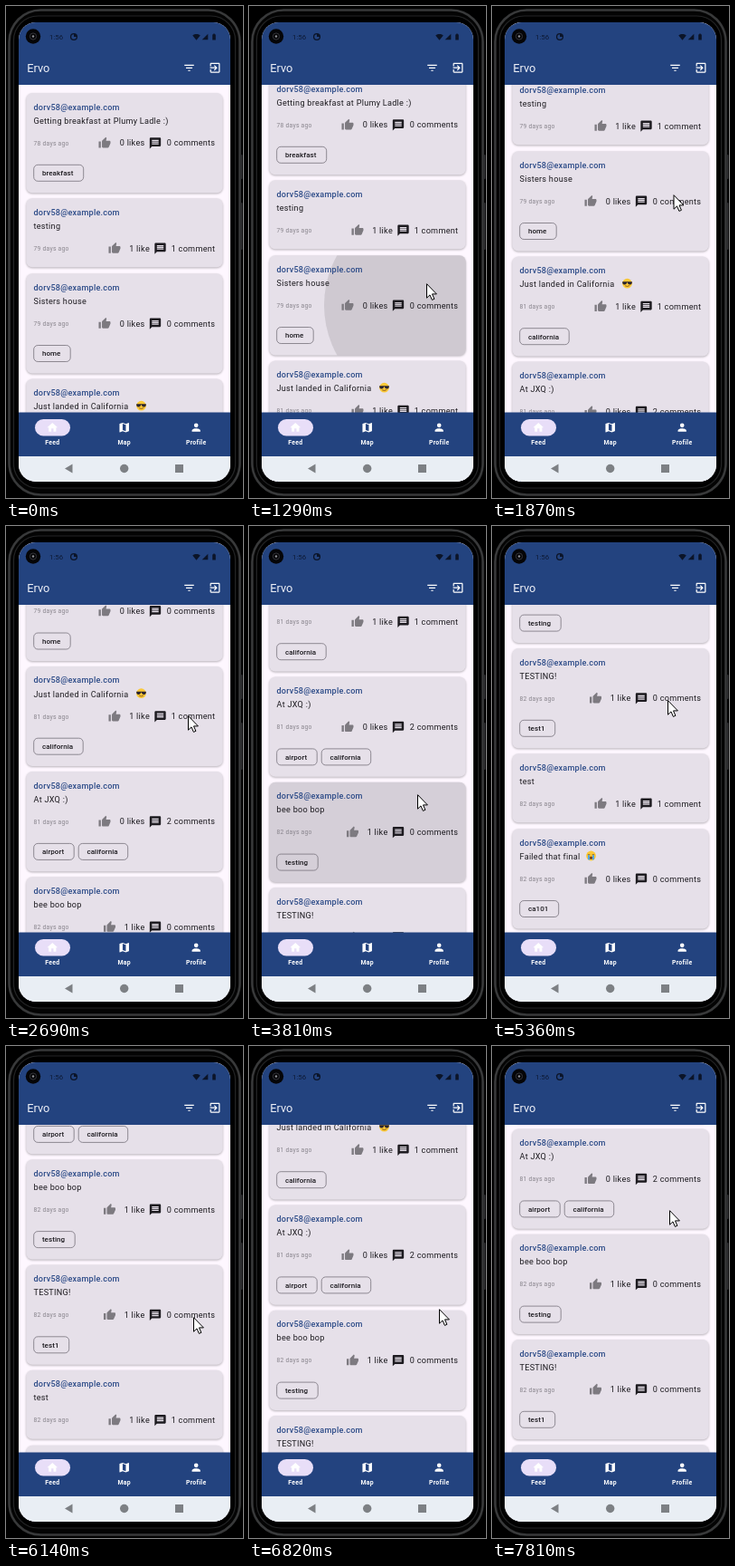
Write an HTML page that moves like this. It is 262x543 px and loops after 8000 ms.

```html
<!DOCTYPE html>
<html lang="en">
<head>
<meta charset="utf-8">
<title>Feed</title>
<style>
html, body { margin: 0; width: 100%; height: 100%; overflow: hidden; background: #000; }
svg { display: block; width: 262px; height: 543px; font-family: Roboto, sans-serif; }
.mail { font-size: 9.1px; font-weight: 500; letter-spacing: .2px; fill: #2b4a87; }
.body { font-size: 9.1px; letter-spacing: .28px; fill: #1d1b20; }
.age { font-size: 6.8px; letter-spacing: .23px; fill: #8a868e; }
.end { text-anchor: end; }
.tag { font-size: 8px; font-weight: 500; letter-spacing: .06px; fill: #1d1b20; }
.nav { font-size: 6.9px; font-weight: 700; letter-spacing: .25px; fill: #fff; text-anchor: middle; }
.card { fill: #e6e0e9; filter: drop-shadow(0 1px 1px rgba(0, 0, 0, .28)); }
.chip { fill: none; stroke: #77727c; stroke-width: .8; }
</style>
</head>
<body>
<svg id="stage" viewBox="0 0 262 543"></svg>
<script>
const LOOP = 8000, BLUE = '#23437f', MAIL = 'dorv58@example.com';

const ICONS = {
  thumb: 'M1 21h4V9H1v12zm22-11c0-1.1-.9-2-2-2h-6.31l.95-4.57.03-.32c0-.41-.17-.79-.44-1.06L14.17 1 7.59 7.59C7.22 7.95 7 8.45 7 9v10c0 1.1.9 2 2 2h9c.83 0 1.54-.5 1.84-1.22l3.02-7.05c.09-.23.14-.47.14-.73v-2z',
  note: 'M20 2H4c-1.1 0-2 .9-2 2v18l4-4h14c1.1 0 2-.9 2-2V4c0-1.1-.9-2-2-2zm-2 12H6v-2h12v2zm0-3H6V9h12v2zm0-3H6V6h12v2z',
  filter: 'M10 18h4v-2h-4v2zM3 6v2h18V6H3zm3 7h12v-2H6v2z',
  exit: 'M10.1 15.6 11.5 17l5-5-5-5-1.4 1.4 2.6 2.6H3v2h9.7zM19 3H5c-1.1 0-2 .9-2 2v4h2V5h14v14H5v-4H3v4c0 1.1.9 2 2 2h14c1.1 0 2-.9 2-2V5c0-1.1-.9-2-2-2z',
  home: 'M10 20v-6h4v6h5v-8h3L12 3 2 12h3v8z',
  map: 'M20.5 3 15 5.1 9 3 3.4 4.9 3 5.4V20.5l.7.5L9 18.9l6 2.1 5.6-1.9.4-.5V3.5zM15 19l-6-2.1V5l6 2.1z',
  person: 'M12 12a4 4 0 1 0 0-8 4 4 0 0 0 0 8zm0 2c-2.7 0-8 1.3-8 4v2h16v-2c0-2.7-5.3-4-8-4z',
  wifi: 'M12 21 24 6.5C20 3.3 16 2 12 2S4 3.3 0 6.5z',
  signal: 'M2 22h20V2z',
  battery: 'M15.7 4H14V2h-4v2H8.3L7 5.3V22h10V5.3z'
};

const CHIPS = { breakfast: 55, home: 40.5, california: 54.5, airport: 44.5, testing: 45.5, test1: 39, ca101: 43 };

const POSTS = [
  { text: 'Getting breakfast at Plumy Ladle :)', age: 78, likes: 0, notes: 0, tags: ['breakfast'] },
  { text: 'testing', age: 79, likes: 1, notes: 1, tags: [] },
  { text: 'Sisters house', age: 79, likes: 0, notes: 0, tags: ['home'] },
  { text: 'Just landed in California', age: 81, likes: 1, notes: 1, tags: ['california'], face: 'cool', faceX: 149.5 },
  { text: 'At JXQ :)', age: 81, likes: 0, notes: 2, tags: ['airport', 'california'] },
  { text: 'bee boo bop', age: 82, likes: 1, notes: 0, tags: ['testing'] },
  { text: 'TESTING!', age: 82, likes: 1, notes: 0, tags: ['test1'] },
  { text: 'test', age: 82, likes: 1, notes: 1, tags: [] },
  { text: 'Failed that final', age: 82, likes: 0, notes: 0, tags: ['ca101'], face: 'sob', faceX: 109.5 }
];

// Bursts of movement: keys are [step, scroll, cursor x, cursor y]
const BURSTS = [
  { from: 310, to: 430, steps: 2, keys: [[0, 0, 252, 418], [1, 0, 254, 418]] },
  { from: 710, to: 840, steps: 2, keys: [[0, 0, 222, 376], [1, 0, 196, 343]] },
  { from: 1290, to: 2270, steps: 8, keys: [[0, 20, 196, 306], [3, 118, 200, 208], [5, 152, 201, 208], [7, 165, 203, 300]] },
  { from: 2420, to: 3420, steps: 8, keys: [[0, 175, 203, 290], [2, 256.5, 201, 209], [4, 316, 201, 209], [7, 341, 188, 316]] },
  { from: 3690, to: 4110, steps: 4, keys: [[0, 341, 186, 316], [1, 361, 186, 296], [3, 455, 190, 200]] },
  { from: 4510, to: 5500, steps: 8, keys: [[0, 465, 192, 290], [3, 563, 194, 192], [5, 615, 194, 192], [6, 625, 194, 192], [7, 625, 195, 192]] },
  { from: 5750, to: 6690, steps: 8, keys: [[0, 610, 196, 207], [3, 518.5, 207, 299], [5, 420, 209, 330], [7, 345, 210, 305]] },
  { from: 6820, to: 7370, steps: 5, keys: [[0, 352, 210, 290], [3, 425, 210, 210], [4, 436, 210, 199]] },
  { from: 7680, to: 7810, steps: 2, keys: [[0, 436, 203, 190], [1, 436, 196, 181]] }
];

const PRESSES = [
  { from: 1290, to: 1425, post: 2, r: 113, alpha: .1 },
  { from: 3690, to: 3945, post: 5, r: 260, alpha: .075 }
];

const icon = (name, cx, cy, size, fill) =>
  `<path d="${ICONS[name]}" fill="${fill}" fill-rule="evenodd" transform="translate(${cx - size / 2} ${cy - size / 2}) scale(${size / 24})"/>`;
const text = (cls, x, y, str) => `<text class="${cls}" x="${x}" y="${y}">${str}</text>`;
const rect = (x, y, w, h, r, attrs = '') => `<rect x="${x}" y="${y}" width="${w}" height="${h}" rx="${r}" ${attrs}/>`;
const count = (n, word) => `${n} ${word}${n === 1 ? '' : 's'}`;

function face(kind, x) {
  const head = '<circle r="5.4" fill="#fbc937"/>';
  const parts = kind === 'cool'
    ? '<path d="M-5.3-2H5.3V-.5Q4.500 1.6 2.5 1.3T.4-1H-.4Q-.5 1-2.5 1.3T-5.3-.5z" fill="#2a2430"/><path d="M-2.3 2.6Q.5 4 2.6 2.3" fill="none" stroke="#7a4a18" stroke-width=".8"/>'
    : '<path d="M-3.7-1.2h2.6M1.1-1.2h2.6" stroke="#6b4520" stroke-width=".8"/><path d="M-3.5-.8h2v5.5l-2-.6zM1.5-.8h2v4.9l-2 .6z" fill="#4fa5ea"/><ellipse cy="2.3" rx="1.4" ry="1.7" fill="#6b3a20"/>';
  return `<g transform="translate(${x} 29.8)">${head}${parts}</g>`;
}

function card(post, i) {
  const h = post.tags.length ? 110.2 : 76;
  const noteX = post.notes === 1 ? 164 : 158.5;
  const thumbX = noteX - (post.likes === 1 ? 51 : 56.5);
  let x = 30.7, chips = '';
  for (const tag of post.tags) {
    chips += rect(x, 79.3, CHIPS[tag], 18, 4.5, 'class="chip"') + text('tag', x + 9.2, 91.2, tag);
    x += CHIPS[tag] + 5;
  }
  return `<g transform="translate(0 ${post.y})">
    ${rect(22.3, 0, 217.4, h, 6.8, 'class="card"')}
    <clipPath id="clip${i}">${rect(22.3, 0, 217.4, h, 6.8)}</clipPath>
    <g clip-path="url(#clip${i})"><circle class="ripple" cx="196" cy="${h / 2}" r="0"/></g>
    ${text('mail', 30.5, 18.5, MAIL)}${text('body', 30.5, 33.7, post.text)}
    ${post.face ? face(post.face, post.faceX) : ''}
    ${text('age', 30.5, 57.7, post.age + ' days ago')}
    ${icon('thumb', thumbX + 7, 55.2, 14.2, '#7d7a80')}
    ${text('body end', noteX - 5, 58.4, count(post.likes, 'like'))}
    ${icon('note', noteX + 6.5, 55.4, 14.8, '#1d1b20')}
    ${text('body end', 231.3, 58.4, count(post.notes, 'comment'))}
    ${chips}</g>`;
}

let nextY = 96;
for (const post of POSTS) {
  post.y = nextY;
  nextY += post.tags.length ? 116.2 : 83;
}

const phone = rect(3.5, 4.5, 255, 535, 35, 'fill="#040404" stroke="#38393a" stroke-width="2.6"')
  + rect(8.5, 11, 245, 521, 27, 'fill="#000" stroke="#242526" stroke-width="1.2"')
  + rect(260, 164, 1.5, 27, .7, 'fill="#2c2c2f"') + rect(260, 217, 1.5, 52, .7, 'fill="#2c2c2f"');

const header = rect(14, 18, 234, 69, 0, `fill="${BLUE}"`)
  + '<circle cx="30" cy="33.5" r="8.2" fill="#050507"/><circle cx="30" cy="33.5" r="3.6" fill="none" stroke="#34343a"/><circle cx="30" cy="33.5" r="1.2" fill="#8d8d92"/>'
  + '<text x="48" y="37" font-size="7.8" fill="#0e1a35">1:56</text>'
  + '<circle cx="75" cy="34" r="3.4" fill="none" stroke="#0b1428" stroke-width="1.3"/><path d="M75 34V30.8A3.2 3.2 0 0 1 78.2 34z" fill="#0b1428"/>'
  + icon('wifi', 210.5, 34.5, 8.5, '#0b1428') + icon('signal', 220, 34, 8, '#0b1428') + icon('battery', 230, 34, 8.5, '#0b1428')
  + '<text x="23.3" y="72.9" font-size="12.8" fill="#eef0f7">Ervo</text>'
  + icon('filter', 202.5, 68.3, 14, '#fff') + icon('exit', 231, 68.2, 14.5, '#fff');

const footer = rect(14, 448.5, 234, 48.5, 0, `fill="${BLUE}"`)
  + rect(32, 456, 39, 18.5, 9.25, 'fill="#e8def8"')
  + icon('home', 51.3, 465.2, 14, '#fff') + icon('map', 130.7, 465.2, 14, '#fff') + icon('person', 210.2, 465.2, 14, '#fff')
  + text('nav', 51.3, 484, 'Feed') + text('nav', 130.7, 484, 'Map') + text('nav', 210.2, 484, 'Profile')
  + rect(14, 497, 234, 28, 0, 'fill="#e9eef4"')
  + '<g fill="#7d8084"><path d="M65 510.5l8.5-5v10z"/><circle cx="130.7" cy="510.5" r="4.7"/><path d="M187 506h9v9h-9z"/></g>';

document.getElementById('stage').innerHTML = `
  <clipPath id="screen">${rect(14, 18, 234, 507, 19)}</clipPath>
  ${phone}
  <g clip-path="url(#screen)">
    ${rect(14, 18, 234, 507, 0, 'fill="#fef7ff"')}
    <g id="list">${POSTS.map(card).join('')}</g>
    ${header}${footer}
  </g>
  <path id="cursor" d="M.5.7V16.2L4 12.9 6.4 18.4 8.9 17.3 6.5 11.9H11.4z" fill="#fff" stroke="#000"/>`;

const list = document.getElementById('list');
const cursor = document.getElementById('cursor');
const ripples = [...document.querySelectorAll('.ripple')];

function pose(t) {
  const burst = BURSTS.filter(b => b.from <= t).pop();
  if (!burst) return [0, 300, 418];
  const { from, to, steps, keys } = burst;
  const gap = (to - from) / (steps - 1);
  const step = Math.min(steps - 1, Math.floor((t - from + 22) / gap));
  const j = Math.max(1, keys.findIndex(k => k[0] >= step));
  const a = keys[j - 1], b = keys[j];
  const p = (step - a[0]) / (b[0] - a[0]);
  return [1, 2, 3].map(i => a[i] + (b[i] - a[i]) * p);
}

function draw(t) {
  const [scroll, x, y] = pose(t);
  list.setAttribute('transform', `translate(0 ${-scroll})`);
  cursor.setAttribute('transform', `translate(${x} ${y})`);
  ripples.forEach((dot, i) => {
    const press = PRESSES.find(p => p.post === i && t >= p.from && t < p.to);
    dot.setAttribute('r', press ? press.r : 0);
    dot.setAttribute('fill-opacity', press ? press.alpha : 0);
  });
}

const start = performance.now();
function tick() {
  draw((performance.now() - start) % LOOP);
  requestAnimationFrame(tick);
}
tick();
</script>
</body>
</html>
```
